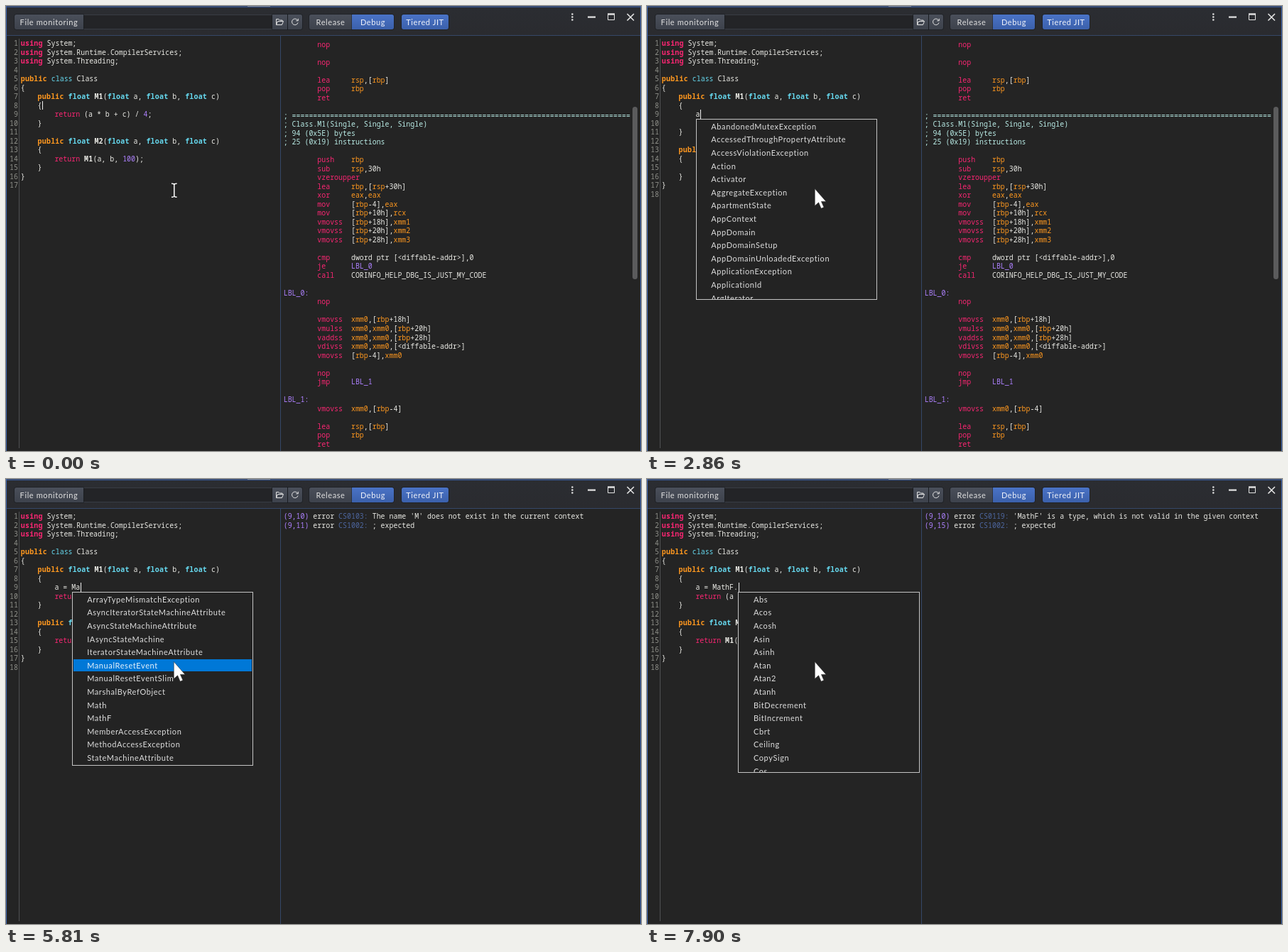
These frames come from a looping animation (894 by 627 pixels, 8 s). An HTML page:

```html
<!DOCTYPE html>
<html lang="en">
<head>
<meta charset="utf-8">
<title>Live disassembly</title>
<style>
  html, body { margin: 0; width: 100%; height: 100%; overflow: hidden; background: #242424; }
  #app { position: relative; width: 894px; height: 627px; overflow: hidden; background: #242424;
    font: 11px Lato, "Open Sans", sans-serif; letter-spacing: .6px; color: #e2e2e2; }
  #app > * { position: absolute; box-sizing: border-box; }
  [hidden] { display: none !important; }

  .bar { left: 0; top: 0; width: 894px; height: 42px; background: linear-gradient(#2b2d32, #2a2b2f);
    border-top: 1px solid #3c4a66; box-shadow: inset 0 1px #36538c; }
  .leak { left: 340px; top: 0; width: 32px; height: 1px; background: #85878c; }
  .edge { top: 0; width: 1px; height: 627px; background: #3d64ad; }
  .rule { background: #354768; }
  .btn { top: 12px; height: 21px; display: flex; align-items: center; justify-content: center;
    background: linear-gradient(#4a4f5a, #3d424c); border-radius: 3px; white-space: nowrap;
    box-shadow: 0 0 0 1px #10161a66; }
  .blue { background: linear-gradient(#4a73c6, #3b60ab); color: #f0f3fa; }
  .path { left: 109px; top: 12px; width: 266px; height: 21px; background: #232427;
    border: solid #383c44; border-width: 1px 0; }

  pre { margin: 0; font: 9.94px/12.52px "Noto Sans Mono", "DejaVu Sans Mono", monospace;
    letter-spacing: 0; color: #e9e9e4; }
  #gutter { left: 0; top: 46.2px; width: 17px; text-align: right; color: #8f908a; }
  #code { left: 20.8px; top: 46.2px; }
  #output { left: 390.7px; }
  .using, .public, .float, .method { font-weight: 700; letter-spacing: .22px; }
  .using, .return, .op { color: #f92672; }
  .public, .reg { color: #fd971f; }
  .float, .class { color: #66d9ef; }
  .num, .label, .pos { color: #ae81ff; }
  .note { color: #b9ece6; }
  .id { color: #4d669f; }

  #caret { width: 1px; height: 12.5px; background: #f0f0f0; }
  #wave { top: 157px; height: 1px; background: #d8434b; }
  #scroll { left: 882px; top: 142px; width: 7px; height: 243px; border-radius: 4px; background: #5b5b5c; }
  #busy { left: 387px; top: 42px; width: 506px; height: 14px;
    background: repeating-linear-gradient(45deg, #424956 0 25%, #2b2f36 0 50%) 0 0 / 28px 28px; }

  #popup { top: 159px; width: 255.4px; max-height: 255px; padding: 0 1px 1px; overflow: hidden;
    display: flex; flex-direction: column;
    background: #232323; border: 1px solid #c4c4c4; color: #dedede; }
  #popup div { flex: none; height: 17px; line-height: 17px; margin: .8px 0; padding-left: 19.5px;
    white-space: nowrap; }
  #popup .on { background: #0078d7; color: #e8f2fb; }
  #tip { left: 351px; top: 158px; height: 25px; line-height: 25px; padding: 0 8px; white-space: nowrap;
    background: #2d2f34; border-radius: 4px; box-shadow: 0 1px 4px #0009; color: #f4f4f4; }
  #tip i { font-style: normal; color: #e83a72; }
  #tip b { font-weight: 400; color: #66d9ef; }
  #tip span { text-shadow: .3px 0 #f4f4f4; }
  svg { left: 0; top: 0; pointer-events: none; }
</style>
</head>
<body>
<div id="app">
  <div class="bar"></div>
  <div class="path"></div>
  <div class="btn" style="left:12px;width:97px;border-radius:3px 0 0 3px">File monitoring</div>
  <div class="btn" style="left:375px;width:21px;border-radius:0"></div>
  <div class="btn" style="left:397px;width:20px;border-radius:0 3px 3px 0"></div>
  <div class="btn" style="left:427px;width:60px;border-radius:3px 0 0 3px">Release</div>
  <div class="btn blue" style="left:487px;width:59px;border-radius:0 3px 3px 0">Debug</div>
  <div class="btn blue" style="left:557px;width:66px">Tiered JIT</div>

  <div class="rule" style="left:0;top:41px;width:894px;height:1px"></div>
  <div class="rule" style="left:386px;top:42px;width:1px;height:585px"></div>
  <div style="left:18px;top:46px;width:1px;height:577px;background:#505152"></div>
  <pre id="gutter"></pre>
  <pre id="code"></pre>
  <pre id="output"></pre>
  <div id="scroll"></div>
  <div id="wave"></div>
  <div id="caret"></div>
  <div id="busy"></div>
  <div id="tip"></div>
  <div id="popup"></div>
  <div class="edge" style="left:0"></div>
  <div class="edge" style="left:893px"></div>
  <div class="leak"></div>

  <svg width="894" height="627" fill="none" stroke="#e4e4e4">
    <path d="M380.5 26.5V18.5H384L385.5 20H389V21.5M380.5 26.5L382.5 21.5H390.5L388.5 26.5Z"/>
    <path d="M410.6 20.2A4.3 4.3 0 1 0 411 23.5M411.3 17.8V20.8H408.3"/>
    <g fill="#e4e4e4" stroke="none">
      <circle cx="797.3" cy="11.5" r="1.3"/><circle cx="797.3" cy="15.5" r="1.3"/><circle cx="797.3" cy="19.5" r="1.3"/>
      <path d="M819 14.500h11v2.200h-11z"/>
    </g>
    <path d="M847.5 11v8.500h9V11"/><path d="M847 11.500h10" stroke-width="2.4"/>
    <path d="M874.5 11l9.500 9.500M884 11l-9.500 9.500" stroke-width="1.6"/>
    <path id="beam" stroke="#fff" stroke-width="1.5"
      d="M233 250.200Q236.500 250 236.800 252Q237 250 240.600 250.200M236.800 252V267.500M233 269.300Q236.500 269.500 236.800 267.500Q237 269.500 240.600 269.300"/>
    <path id="arrow" fill="#fff" stroke="#222" stroke-width=".5"
      d="M236.300 257.500V281.500L241.600 276.800L245.200 285.200L249 283.600L245.400 275.400H252Z"/>
  </svg>
</div>
<script>
const LOOP = 8000, COL = 5.964, ROW = 12.52, LEFT = 20.8, TOP = 46.2, EDIT_ROW = 8;
const $ = id => document.getElementById(id);
const escapeHtml = s => s.replace(/</g, '&lt;');

// Wraps each match in a span named after its capture group.
const paint = (text, rule) => escapeHtml(text).replace(rule, (match, ...rest) => {
  const groups = rest.at(-1);
  return `<span class="${Object.keys(groups).find(k => groups[k])}">${match}</span>`;
});

const CODE_RULE = /\b(?:(?<using>using)|(?<public>public)|(?<float>float)|(?<class>class)|(?<return>return)|(?<method>M[12])|(?<num>\d+))\b/g;
const ASM_RULE = /(?<note>^;.*)|(?<op>^ {8}\w+)|(?<label>LBL_\d:?)|(?<reg>\b(?:r[bs]p|eax|rcx|xmm\d)\b)/gm;
const ERROR_RULE = /(?<pos>^\(.*?\))|(?<id>CS\d+:)/gm;

const SOURCE = `using System;
using System.Runtime.CompilerServices;
using System.Threading;

public class Class
{
    public float M1(float a, float b, float c)
    {
        return (a * b + c) / 4;
    }

    public float M2(float a, float b, float c)
    {
        return M1(a, b, 100);
    }
}
`.split('\n');

const ASM = `nop

nop

lea rsp,[rbp]
pop rbp
ret

; ${'='.repeat(80)}
; Class.M1(Single, Single, Single)
; 94 (0x5E) bytes
; 25 (0x19) instructions

push rbp
sub rsp,30h
vzeroupper
lea rbp,[rsp+30h]
xor eax,eax
mov [rbp-4],eax
mov [rbp+10h],rcx
vmovss [rbp+18h],xmm1
vmovss [rbp+20h],xmm2
vmovss [rbp+28h],xmm3

cmp dword ptr [<diffable-addr>],0
je LBL_0
call CORINFO_HELP_DBG_IS_JUST_MY_CODE

LBL_0:
nop

vmovss xmm0,[rbp+18h]
vmulss xmm0,xmm0,[rbp+20h]
vaddss xmm0,xmm0,[rbp+28h]
vdivss xmm0,xmm0,[<diffable-addr>]
vmovss [rbp-4],xmm0

nop
jmp LBL_1

LBL_1:
vmovss xmm0,[rbp-4]

lea rsp,[rbp]
pop rbp
ret`.replace(/^([a-z]+) ?/gm, (_, op) => ' '.repeat(8) + op.padEnd(8));

const errors = (col, first, endCol) =>
  `(9,${col}) error ${first}\n(9,${endCol}) error CS1002: ; expected`;
const unknown = name =>
  errors(10, `CS0103: The name '${name}' does not exist in the current context`, 10 + name.length);

const words = s => s.split(' ');
const LIST_A = words('AbandonedMutexException AccessedThroughPropertyAttribute AccessViolationException Action Activator AggregateException ApartmentState AppContext AppDomain AppDomainSetup AppDomainUnloadedException ApplicationException ApplicationId ArgIterator');
const LIST_M = words('AbandonedMutexException ArrayTypeMismatchException AsyncIteratorMethodBuilder AsyncIteratorStateMachineAttribute AsyncMethodBuilderAttribute AsyncStateMachineAttribute AsyncTaskMethodBuilder AsyncValueTaskMethodBuilder AsyncVoidMethodBuilder CallerMemberNameAttribute DataMisalignedException EventResetMode GCCollectionMode GCMemoryInfo');
const LIST_MA = words('ArrayTypeMismatchException AsyncIteratorStateMachineAttribute AsyncStateMachineAttribute IAsyncStateMachine IteratorStateMachineAttribute ManualResetEvent ManualResetEventSlim MarshalByRefObject Math MathF MemberAccessException MethodAccessException StateMachineAttribute');
const LIST_MAT = words('ArrayTypeMismatchException Math MathF');
const LIST_DOT = words('Abs Acos Acosh Asin Asinh Atan Atan2 Atanh BitDecrement BitIncrement Cbrt Ceiling CopySign Cos');

const INDENT = ' '.repeat(8);
const popup = (col, items, pick = -1) => ({ col, items, pick });
const tip = (space, name, alpha = 1) => ({ space, name, alpha });
const wave = (col, len) => ({ col, len });

// Each step changes only the listed parts of the state.
const STEPS = [
  [0, { typed: null, pointer: 'beam', output: null, popup: null, tip: null, wave: null, busy: false }],
  [610, { typed: '    ' }],
  [1070, { typed: INDENT }],
  [1550, { busy: true }],
  [1930, { busy: false }],
  [2790, { typed: INDENT + 'a' }],
  [2860, { popup: popup(8, LIST_A), pointer: 'arrow' }],
  [3020, { typed: INDENT + 'a ', popup: null, pointer: 'beam' }],
  [3260, { typed: INDENT + 'a =', pointer: null }],
  [3410, { typed: INDENT + 'a = ' }],
  [3960, { busy: true }],
  [4040, { busy: false, wave: wave(11, 1), output: errors(9, "CS1525: Invalid expression term 'return'", 9) }],
  [4890, { typed: INDENT + 'a = M', wave: null, popup: popup(12, LIST_M), pointer: 'arrow' }],
  [5350, { busy: true }],
  [5430, { busy: false, wave: wave(12, 2), output: unknown('M') }],
  [5810, { typed: INDENT + 'a = Ma', wave: null, popup: popup(12, LIST_MA, 5) }],
  [5890, { tip: tip('System.Threading.', 'ManualResetEvent', .5) }],
  [5970, { tip: tip('System.Threading.', 'ManualResetEvent') }],
  [6200, { typed: INDENT + 'a = Mat', popup: popup(12, LIST_MAT, 1), pointer: 'beam', tip: tip('System.', 'Math', .5) }],
  [6270, { tip: tip('System.', 'Math') }],
  [6750, { busy: true, popup: popup(12, LIST_MAT, 2), tip: tip('System.', 'MathF') }],
  [6820, { busy: false, wave: wave(12, 4), output: unknown('Mat') }],
  [7050, { typed: INDENT + 'a = MathF', wave: null, popup: null, tip: tip('System.', 'MathF', .6) }],
  [7130, { tip: tip('System.', 'MathF', .25) }],
  [7210, { tip: null }],
  [7590, { busy: true }],
  [7670, { busy: false, wave: wave(12, 6), output: errors(10, "CS0119: 'MathF' is a type, which is not valid in the given context", 15) }],
  [7820, { typed: INDENT + 'a = MathF.', wave: null }],
  [7900, { popup: popup(18, LIST_DOT), pointer: 'arrow' }],
];
let merged = {};
const STATES = STEPS.map(([at, change]) => merged = { ...merged, ...change, at });

const colX = col => LEFT + col * COL;

function show(s) {
  const fresh = s.typed === null;
  const lines = [...SOURCE];
  if (!fresh) lines.splice(EDIT_ROW, 0, s.typed);
  $('code').innerHTML = paint(lines.join('\n'), CODE_RULE);
  $('gutter').textContent = lines.map((_, i) => i + 1).join('\n');
  $('caret').style.left = Math.round(colX(fresh ? 5 : s.typed.length) + .4) + 'px';
  $('caret').style.top = TOP + ROW * (fresh ? EDIT_ROW - 1 : EDIT_ROW) + 'px';

  const asm = s.output === null;
  $('output').innerHTML = asm ? paint(ASM, ASM_RULE) : paint(s.output, ERROR_RULE);
  $('output').style.top = (asm ? 47.5 : TOP) + 'px';
  $('scroll').hidden = !asm;
  $('busy').hidden = !s.busy;

  $('wave').hidden = !s.wave;
  if (s.wave) {
    $('wave').style.left = colX(s.wave.col) + 'px';
    $('wave').style.width = s.wave.len * COL + 'px';
  }
  $('popup').hidden = !s.popup;
  if (s.popup) {
    $('popup').style.left = colX(s.popup.col) + .3 + 'px';
    $('popup').innerHTML = s.popup.items
      .map((item, i) => `<div class="${i === s.popup.pick ? 'on' : ''}">${item}</div>`).join('');
  }
  $('tip').hidden = !s.tip;
  if (s.tip) {
    $('tip').style.opacity = s.tip.alpha;
    $('tip').innerHTML = `<i>class</i> <span>${s.tip.space}</span><b>${s.tip.name}</b>`;
  }
  for (const id of ['beam', 'arrow']) $(id).style.display = s.pointer === id ? '' : 'none';
}

const start = performance.now();
let current;
function frame() {
  const t = (performance.now() - start) % LOOP;
  const state = STATES.findLast(s => s.at <= t);
  if (state !== current) show(current = state);
  if (state.busy) $('busy').style.backgroundPositionX = Math.floor((t - state.at) / 76) * 6 - 6 + 'px';
  requestAnimationFrame(frame);
}
frame();
</script>
</body>
</html>
```
